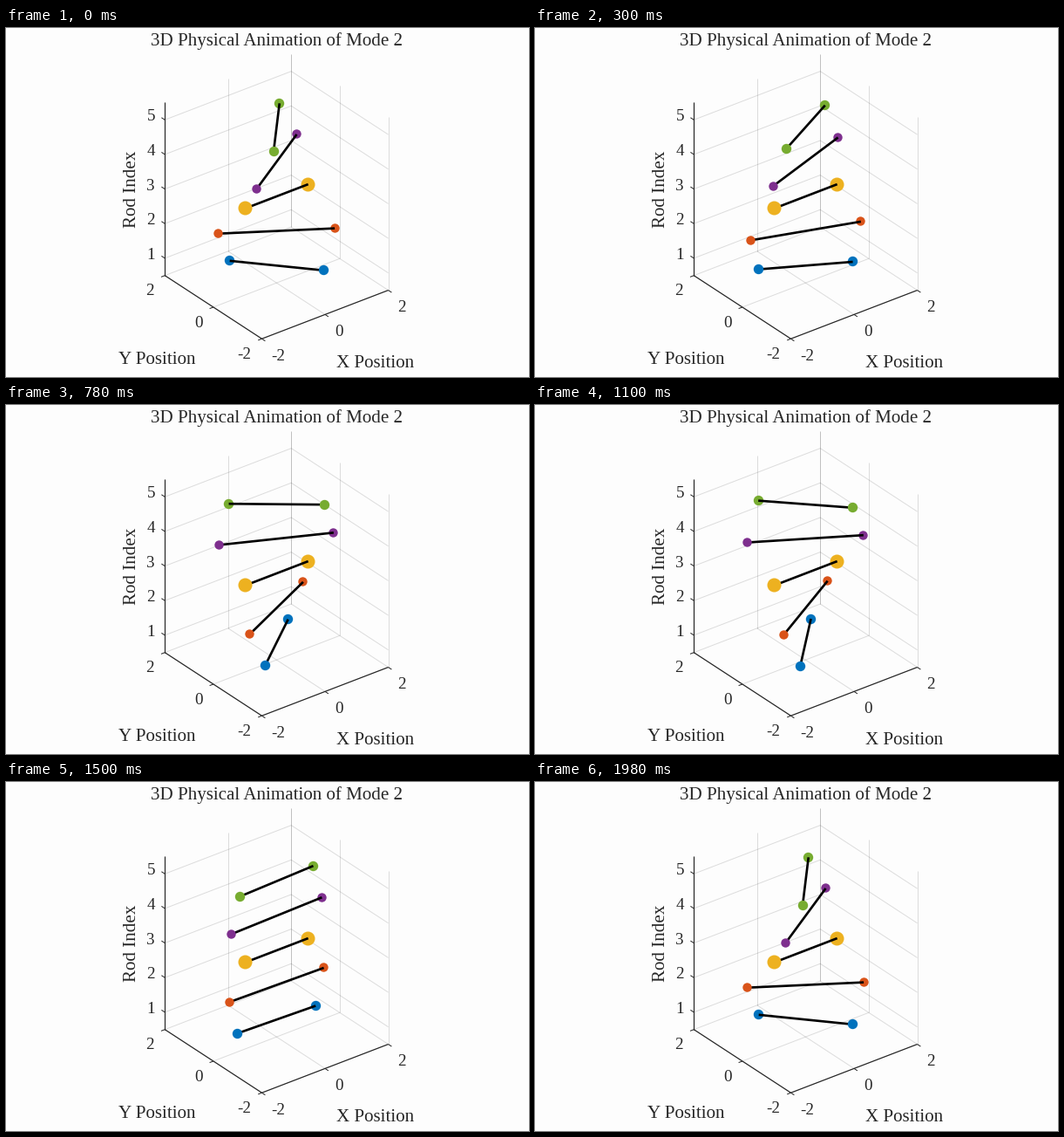
A matplotlib script that plays this animation: 600x400 px, repeating every 2000 ms.

```python
import numpy as np
import matplotlib.pyplot as plt
from matplotlib.animation import FuncAnimation
from matplotlib.patches import Circle

W, H, DPI = 600, 400, 100
FRAMES, INTERVAL = 100, 20
PT = 72 / DPI                      # points per pixel
INK, PAPER = "#262626", "#FDFDFD"

# Orthographic view: azimuth -37.5, elevation 30
CENTER = np.array([310.4, 193.0])
AZ, UNIT, RISE = np.radians(37.5), 45.7, 39.65
SIN, COS = np.sin(AZ), np.cos(AZ)

# colour, half length, swing in degrees, marker radius
RODS = [
    ("#0072BD", 1.200, -49.0, 5.7),
    ("#D95319", 1.465, -32.3, 5.2),
    ("#EDB120", 1.000, 0.0, 8.0),
    ("#7E2F8E", 1.465, 32.3, 5.2),
    ("#77AC30", 1.200, 49.0, 5.7),
]


def project(x, y, z):
    return CENTER + np.array([UNIT * (x * COS - y * SIN),
                              -UNIT * (x * SIN + y * COS) / 2 - RISE * (z - 3)])


fig = plt.figure(figsize=(W / DPI, H / DPI), dpi=DPI, facecolor=PAPER)
ax = fig.add_axes([0, 0, 1, 1])
ax.set(xlim=(0, W), ylim=(H, 0))
ax.axis("off")


def segment(p, q, width=1.0, color=INK, alpha=1.0, z=1):
    line, = ax.plot([p[0], q[0]], [p[1], q[1]], color=color, alpha=alpha,
                    lw=width * PT, zorder=z, solid_capstyle="butt")
    return line


def text(x, y, s, size, ha="center", **kw):
    ax.text(x, y, s, fontsize=size * PT, family="Liberation Serif",
            ha=ha, va="baseline", color=INK, **kw)


def grid(a, b):
    segment(project(*a), project(*b), alpha=0.15)


def tick(p, toward):
    step = project(*toward) - project(0, 0, 3)
    segment(p, p + 4.6 * step / np.hypot(*step), z=2)


def draw_box():
    lo, hi = 0.5, 5.5
    for v in (-2, 0, 2):
        grid((v, -2, lo), (v, 2, lo))
        grid((-2, v, lo), (2, v, lo))
        grid((v, 2, lo), (v, 2, hi))
        grid((2, v, lo), (2, v, hi))
    for z in range(1, 6):
        grid((-2, 2, z), (2, 2, z))
        grid((2, 2, z), (2, -2, z))

    left, front, right = (project(*c, lo) for c in ((-2, 2), (-2, -2), (2, -2)))
    segment(project(-2, 2, hi), left, 1.2, z=2)
    segment(left, front, 1.2, z=2)
    segment(front, right, 1.2, z=2)

    for z in range(1, 6):
        p = project(-2, 2, z)
        tick(p, (0, 1, 3))
        text(171, p[1] + 1, str(z), 19, "right")
    for v in (-2, 0, 2):
        p = project(-2, v, lo)
        tick(p, (-1, 0, 3))
        text(p[0] - 12.5, p[1] + 22.6, str(v), 19, "right")
        p = project(v, -2, lo)
        tick(p, (0, -1, 3))
        text(p[0] + 11, p[1] + 24.6, str(v), 19, "left")

    text(311, 20, "3D Physical Animation of Mode 2", 21)
    text(423.5, 389, "X Position", 21)
    text(173, 385, "Y Position", 21)
    text(149, 185, "Rod Index", 21, rotation=90, rotation_mode="anchor")


draw_box()

bars, ends = [], []
for k, (color, _, _, radius) in enumerate(RODS):
    bars.append(segment((0, 0), (0, 0), 2.67, "black", z=10 + 3 * k))
    ends.append([ax.add_patch(Circle((0, 0), radius, color=color, lw=0))
                 for _ in range(2)])


def update(i):
    phase = np.cos(2 * np.pi * i / (FRAMES - 1))
    for k, (_, half, swing, _) in enumerate(RODS):
        angle = np.radians(swing * phase)
        x, y = half * np.cos(angle), half * np.sin(angle)
        pts = [project(s * x, s * y, k + 1) for s in (-1, 1)]
        bars[k].set_data(*np.transpose(pts))
        for s, dot, p in zip((-1, 1), ends[k], pts):
            dot.center = np.floor(p) + 0.5
            near = s * (x * SIN + y * COS) < 0    # nearer end covers the rod
            dot.set_zorder(10 + 3 * k + (1 if near else -1))
    return bars + [dot for pair in ends for dot in pair]


anim = FuncAnimation(fig, update, frames=FRAMES, interval=INTERVAL,
                     repeat=True, repeat_delay=0, blit=False)
plt.show()
```
